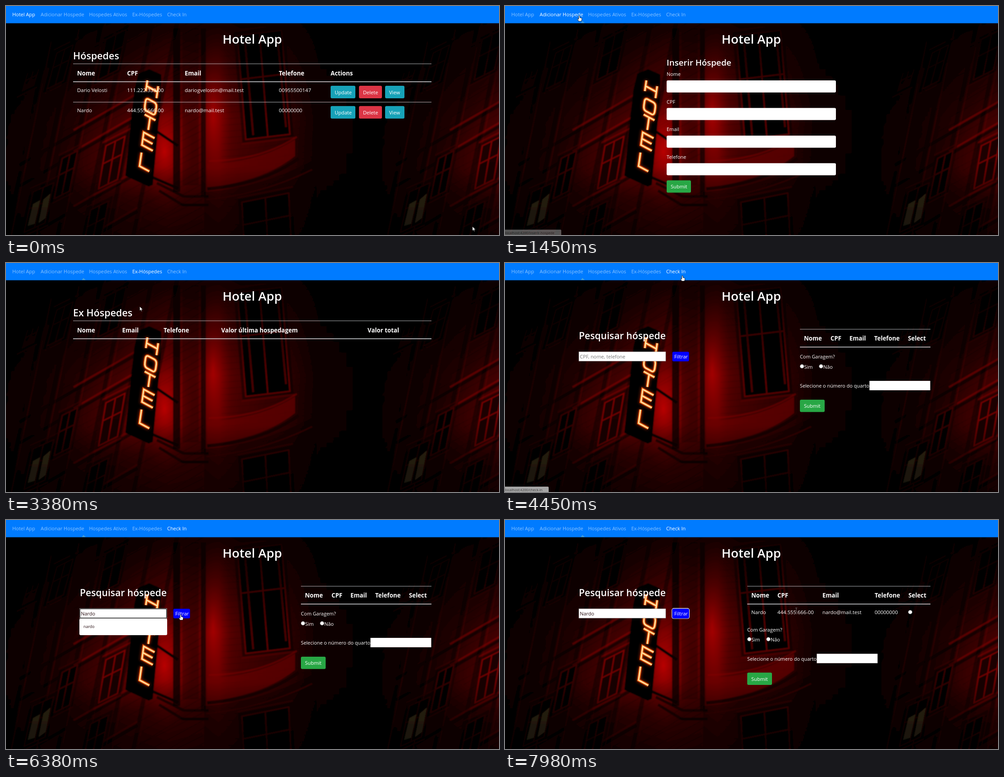
These frames come from a looping animation (1095 by 511 pixels, 8000 ms). An HTML page:

```html
<!DOCTYPE html>
<html lang="pt">
<head>
<meta charset="utf-8">
<title>Hotel App</title>
<style>
  html, body { margin: 0; width: 100%; height: 100%; overflow: hidden; background: #000; }
  svg { display: block; width: 100%; height: 100%; }
  text { font-family: "Open Sans", "Noto Sans", sans-serif; fill: #fff; white-space: pre; }
  .h { font-weight: 600; }
  .b { font-weight: 700; font-size: 13.3px; }
</style>
</head>
<body>
<svg id="stage" viewBox="0 0 1095 511">
  <defs>
    <linearGradient id="wall">
      <stop offset="0" stop-color="#0c0000"/><stop offset=".12" stop-color="#1a0000"/>
      <stop offset=".3" stop-color="#3a0000"/><stop offset=".43" stop-color="#620000"/>
      <stop offset=".52" stop-color="#540000"/><stop offset=".565" stop-color="#680000"/>
      <stop offset=".62" stop-color="#480000"/><stop offset=".75" stop-color="#2c0000"/>
      <stop offset=".83" stop-color="#0c0000"/><stop offset="1" stop-color="#020000"/>
    </linearGradient>
    <linearGradient id="shade" x2="0" y2="1">
      <stop offset="0" stop-opacity=".8"/><stop offset=".25" stop-opacity=".35"/>
      <stop offset=".45" stop-opacity="0"/><stop offset=".68" stop-opacity=".1"/>
      <stop offset=".82" stop-opacity=".5"/><stop offset="1" stop-opacity=".72"/>
    </linearGradient>
    <linearGradient id="corner" x2=".5" y2=".5">
      <stop offset="0" stop-opacity=".95"/><stop offset=".4" stop-opacity=".6"/><stop offset="1" stop-opacity="0"/>
    </linearGradient>
    <radialGradient id="hot">
      <stop offset="0" stop-color="#d00000" stop-opacity=".9"/>
      <stop offset=".5" stop-color="#b00000" stop-opacity=".45"/>
      <stop offset="1" stop-color="#900000" stop-opacity="0"/>
    </radialGradient>
    <filter id="soft"><feGaussianBlur stdDeviation="1.1"/></filter>
    <filter id="glow" x="-50%" width="200%"><feGaussianBlur stdDeviation="3"/></filter>
    <clipPath id="crop"><path d="M0 38H836V511H0Z"/></clipPath>
    <g id="tile" clip-path="url(#crop)"></g>
  </defs>
  <use href="#tile"/><use href="#tile" x="836"/>
  <g id="ui"></g>
  <g id="top"></g>
</svg>
<script>
const $ = id => document.getElementById(id);
const LOOP = 8000;
const GUEST = 'Nardo';
const rect = (x, y, w, h, fill, more = '') =>
  `<rect x="${x}" y="${y}" width="${w}" height="${h}" fill="${fill}" ${more}/>`;
const text = (x, y, s, size = 10.9, more = '') =>
  `<text x="${x}" y="${y}" font-size="${size}" ${more}>${s}</text>`;
const head = (x, y, s, size = 21.6) => text(x, y, s, size, 'class="h"');
const heads = (y, cols) => cols.map(([x, s]) => text(x, y, s, 13.3, 'class="b"')).join('');
const button = (x, y, w, h, fill, s, pad = 9) =>
  rect(x, y, w, h, fill, 'rx="3"') + text(x + pad, y + h / 2 + 4.6, s, 11.1);
const rule = (x, y, h = 1) => rect(x, y, 945 - x, h, '#dee2e6', h > 1 ? '' : 'opacity=".8"');
const radio = (x, y) => `<circle cx="${x}" cy="${y}" r="4.3" fill="#fff" stroke="#767676" stroke-width=".8"/>`;
const line = (d, color, w, more = '') =>
  `<path d="${d}" fill="none" stroke="${color}" stroke-width="${w}" ${more}/>`;

// Night facade: tilted windows, ledges and the neon sign
function windowFrame(x, y, w, h, slope, lean, color, glass = '#060000') {
  return `<g transform="matrix(1 ${slope} ${lean} 1 ${x} ${y})">
    ${rect(-8, -8, w + 16, h + 14, '#000', 'opacity=".4"')}
    ${rect(0, 0, w, h, glass, `stroke="${color}" stroke-width="3"`)}
    ${line(`M${w / 2} 0V${h}M0 ${h * .42}H${w}`, color, 3)}
    ${line(`M-10 -12H${w + 10}M-10 ${h + 9}H${w + 10}`, color, 4, 'opacity=".55"')}</g>`;
}

function facade() {
  let s = rect(0, 38, 836, 473, 'url(#wall)');
  for (let i = 0; i < 40; i++) {
    s += line(`M${120 + i % 3 * 30} ${i * 17 + 130}L440 ${i * 17 - 30}`, '#000', 1.5, 'opacity=".25"');
    s += line(`M478 ${70 + i * 14}Q580 ${66 + i * 14} 690 ${40 + i * 14}`, '#000', 1.2, 'opacity=".18"');
  }
  s += '<ellipse cx="265" cy="370" rx="150" ry="150" fill="url(#hot)" opacity=".28"/>';
  s += '<ellipse cx="352" cy="325" rx="62" ry="135" fill="url(#hot)"/>';
  s += '<ellipse cx="460" cy="235" rx="40" ry="215" fill="url(#hot)" opacity=".7"/>';
  // pilasters and cornices of the left building
  for (let i = 0; i < 6; i++) {
    const x = 25 + i * 56;
    s += line(`M${x + 75} 38L${x - 22} 511`, '#000', 9, 'opacity=".4"');
    s += line(`M${x + 84} 38L${x - 13} 511`, '#700000', 3, 'opacity=".3"');
  }
  for (const y of [215, 262, 385, 470]) {
    s += line(`M30 ${y + 140}L292 ${y - 12}`, '#000', 7, 'opacity=".5"');
    s += line(`M150 ${y + 62}L292 ${y - 20}`, '#8a0000', 4, 'opacity=".55"');
  }
  s += windowFrame(48, 150, 26, 40, -.5, -.3, '#1c0400', '#17100a');
  s += windowFrame(113, 105, 36, 80, -.5, -.27, '#360000');
  s += windowFrame(222, 75, 45, 90, -.5, -.2, '#420000');
  s += windowFrame(222, 312, 42, 96, -.5, -.17, '#820000', '#1c0000');
  s += windowFrame(125, 340, 34, 90, -.5, -.2, '#400000');
  s += windowFrame(60, 415, 46, 90, -.45, -.22, '#2c0000');
  s += windowFrame(188, 455, 40, 90, -.5, -.2, '#480000');
  s += '<path d="M60 442L76 433 64 486 48 491ZM83 432L99 418 88 473 72 485Z" fill="#4a3a18"/>';
  // round tower with its bay window and ledge
  s += windowFrame(514, 66, 98, 232, -.12, .08, '#5c0000', '#060000');
  s += line('M531 80L549 288M603 70L622 270', '#4a0000', 4);
  s += '<path d="M447 352Q560 350 642 298V335Q570 392 447 404Z" fill="#780000" opacity=".6"/>';
  s += line('M450 346Q565 345 646 292', '#900000', 4, 'opacity=".45"');
  s += line('M447 408Q570 398 650 340', '#100000', 7, 'opacity=".7"');
  s += '<path d="M440 415Q570 406 690 340V511H440Z" fill="#000" opacity=".3"/>';
  s += line('M445 432Q570 420 680 365', '#600000', 3, 'opacity=".5"');
  s += windowFrame(524, 438, 104, 120, -.2, .05, '#520000', '#080000');
  s += rect(371, 50, 16, 365, '#080000', 'opacity=".75"') + rect(433, 50, 11, 375, '#080000', 'opacity=".65"');
  s += rect(392, 50, 36, 350, '#000', 'opacity=".2"');
  s += line('M335 395L395 425L450 425M340 412L392 444L450 444', '#100000', 6, 'opacity=".7"');
  s += rect(0, 38, 836, 473, 'url(#shade)') + rect(0, 38, 400, 473, 'url(#corner)');
  s += line('M335 280L382 312M320 380L382 407', '#0a0000', 6);
  s += '<path d="M285 188L294 151 318 141 345 153 345 196 326 399 317 403 265 379Z" fill="#050101"/>';

  const glyphs = [
    [314, 166, 'M0 0V.85M1 0V.95M0 .45H1'],
    [311, 205, 'M.25 0H.75Q1 0 1 .3V.6Q1 .95 .75 .95H.25Q0 .95 0 .6V.3Q0 0 .25 0Z'],
    [308, 242, 'M0 0H1M.5 0V1'],
    [306, 282, 'M1 0H0V1H1M0 .5H.9'],
    [301, 327, 'M0 0V1.08H.9']
  ];
  const neon = (color, w, more = '') => `<g ${more}>` + glyphs.map(([x, y, d]) =>
    line(d, color, w, `transform="matrix(24 13 -4 28 ${x} ${y})" vector-effect="non-scaling-stroke"`)).join('') + '</g>';
  return `<g filter="url(#soft)">${s}</g>` + neon('#e03000', 8, 'filter="url(#glow)" opacity=".6"') +
    neon('#b83a04', 7) + neon('#ff8c2a', 4.6) + neon('#ffe6b0', 2.4);
}
$('tile').innerHTML = facade();

// Pages
function guests() {
  const rows = [
    ['Dario Velosti', '111.222.333-00', 'dariogvelostin@mail.test', '00955500147'],
    [GUEST, '444.555.666-00', 'nardo@mail.test', '00000000']
  ];
  return head(149, 118.5, 'Hóspedes') + rule(149, 128.5) + rule(149, 168.3, 1.5) + rule(149, 214) +
    heads(154.7, [[158, 'Nome'], [269, 'CPF'], [397, 'Email'], [606, 'Telefone'], [721, 'Actions']]) +
    rows.map((row, i) => {
      const y = 178 + i * 45.3;
      return row.map((s, k) => text([158, 269, 397, 606][k], y + 14, s, 11.4)).join('') +
        button(721, y, 55, 28, '#17a2b8', 'Update') + button(784, y, 51, 28, '#dc3545', 'Delete') +
        button(842, y, 43, 28, '#17a2b8', 'View');
    }).join('');
}

const insertForm = () => head(359, 132.6, 'Inserir Hóspede', 18.8) +
  ['Nome', 'CPF', 'Email', 'Telefone'].map((s, i) =>
    text(359, 156 + i * 61.6, s) + rect(359, 166 + i * 61.6, 376, 27, '#fff', 'rx="3"')).join('') +
  button(359, 389, 54, 27.5, '#28a745', 'Submit');

const formerGuests = () => head(149, 118.5, 'Ex Hóspedes') + rule(149, 128.5) + rule(149, 168.3, 1.5) +
  heads(154.7, [[158, 'Nome'], [258, 'Email'], [350, 'Telefone'], [478, 'Valor última hospedagem'], [803, 'Valor total']]);

const roomForm = () => text(655, 213, 'Com Garagem?') + radio(659.6, 230.5) + text(664.5, 235.5, 'Sim') +
  radio(702, 230.5) + text(707, 235.5, 'Não') + text(655, 278, 'Selecione o número do quarto') +
  rect(809.5, 263, 135, 21, '#fff') + button(655, 305, 55, 27.5, '#28a745', 'Submit');

function results(found) {
  const x = found ? [547, 605, 705, 821, 896] : [664, 723, 765, 820, 895];
  const names = ['Nome', 'CPF', 'Email', 'Telefone', 'Select'];
  const row = [GUEST, '444.555.666-00', 'nardo@mail.test', '00000000'];
  return rule(x[0] - 9, 147.3) + rule(x[0] - 9, 186.8, 1.5) + heads(173, names.map((s, i) => [x[i], s])) +
    (found ? row.map((s, i) => text(x[i], 210, s, 11.3)).join('') + radio(900, 205.5) : '') +
    `<g transform="translate(${found ? '-117 35.5' : '0 0'})">${roomForm()}</g>`;
}

function search(t) {
  const focus = t >= 5380 && t < 6720;
  const typed = t < 5580 ? '' : t < 5640 ? 'N' : t < 5710 ? 'Nard' : GUEST;
  let s = head(164, 169.5, 'Pesquisar hóspede', 21.2);
  s += focus
    ? rect(163, 197, 195, 23, '#fff', 'rx="2"') + rect(164.2, 198.2, 192.6, 20.6, '#fff', 'stroke="#101010" stroke-width="1.6" rx="1"')
    : rect(164, 198, 193, 21, '#fff', 'stroke="#8a8a8a" stroke-width=".7"');
  s += text(166.3, 213, typed || 'CPF, nome, telefone', 10.9, `style="fill:${typed ? '#2a1014' : '#757575'}"`);
  if (focus && t < 6240) s += rect(typed ? 166.8 + typed.length * 6.4 : 166.5, 202, .8, 13, '#000');
  if (t >= 6720) s += rect(370.8, 197.2, 38.6, 22.8, '#000', 'rx="4" stroke="#fff" stroke-width="1.2"');
  s += button(371.7, 198, 37, 21.5, '#00f', 'Filtrar', 4.2);
  if (t >= 5580 && t < 6720) {
    const items = t < 5640 ? ['nardo', 'novo', 'nome', 'noite', 'nota'] : ['nardo'];
    s += rect(163, 220, 195, 16.5 + items.length * 20.5, '#fff', 'rx="3"') +
      items.map((w, i) => text(172, 241.3 + i * 20.5, w, 8.9, 'style="fill:#2a1014"')).join('');
  }
  return s;
}

// Timeline
const moves = [[70, 1036, 492], [850, 218, 90], [910, 218, 90], [1080, 165, 21.5], [1840, 165, 21.5],
  [2150, 235, 27], [2330, 351, 27], [2570, 286, 17], [3230, 286, 17], [3380, 297, 97], [3480, 300, 94],
  [3900, 395, 23], [4400, 395, 23], [4910, 356, 196], [4970, 355, 198], [5160, 290, 217],
  [6040, 290, 213], [6380, 388, 211], [7430, 388, 211], [7970, 647, 201]];
const clicks = [[1200, 165, 21], [2680, 286, 16], [4130, 395, 23], [6650, 388, 211]];
const statuses = [[1060, 1200, 1710, 'inserir-hospede'], [2030, 2200, 2270, 'hospedes-ativos'],
  [2450, 3240, 3350, 'ex-hospedes'], [3880, 4900, 5060, 'check-in']];
const links = [[14, 66, 'Hotel App'], [77, 174, 'Adicionar Hospede'], [184.5, 270, 'Hospedes Ativos'],
  [280.5, 347, 'Ex-Hóspedes'], [358, 402, 'Check In']];
const pointers = {
  arrow: '<path d="M0 0V9.6L2.2 7.6 3.8 11 5.2 10.4 3.7 7.1H6.8Z" fill="#fff" stroke="#000" stroke-width=".6"/>',
  hand: '<path d="M-1.2 1Q0-.8 1.2 1V4.6L4.8 5.6Q6 6 5.7 8L4.8 12.5H-1.4L-4 7.8Q-4 6.2-2.6 7L-1.2 8.4Z" fill="#fff" stroke="#000" stroke-width=".8"/>',
  beam: line('M-2-5Q0-5 0-4Q0-5 2-5M0-4V4M-2 5Q0 5 0 4Q0 5 2 5', '#777', 1)
};

function cursorAt(t) {
  const i = moves.findIndex(m => m[0] > t);
  if (i < 1) return (i ? moves[moves.length - 1] : moves[0]).slice(1);
  const [t0, x0, y0] = moves[i - 1], [t1, x1, y1] = moves[i];
  let k = (t - t0) / (t1 - t0);
  k *= k * (3 - 2 * k);
  return [x0 + (x1 - x0) * k, y0 + (y1 - y0) * k];
}

const pageAt = t => t < 1330 ? 0 : t < 2830 ? 1 : t < 4260 ? 3 : 4;
const inside = (x, y, l, t, r, b) => x >= l && x <= r && y >= t && y <= b;

function pageMarkup(page, t) {
  if (page === 0) return guests();
  if (page === 1) return insertForm();
  if (page === 3) return formerGuests();
  return results(t >= 7440) + search(t);
}

function overlay(t, page) {
  const [x, y] = cursorAt(t);
  const hover = links.findIndex(([l, r]) => inside(x, y, l, 8, r, 31));
  let s = rect(0, 0, 1095, 38.5, '#007bff');
  if (t >= 1330) s += '<path d="M168.5 38L172 33.5 177 38Z" fill="#45a0d8"/>';
  links.forEach(([l, , label], i) => {
    s += text(l, 23, label, 10.95, `opacity="${i === page ? 1 : i === hover ? .9 : .55}"`);
  });
  for (const [from, fade, to, path] of statuses) {
    if (t < from || t >= to) continue;
    const alpha = t < fade ? 1 : (to - t) / (to - fade);
    const url = 'localhost:4200/' + path;
    s += `<g opacity="${alpha}">` + rect(-4, 499, url.length * 4 + 9, 16, '#a5a5a5', 'rx="2"') +
      text(0, 509.3, url, 7.6, 'style="fill:#333"') + '</g>';
  }
  for (const [at, cx, cy] of clicks)
    if (t >= at && t < at + 150) s += `<circle cx="${cx}" cy="${cy}" r="9" fill="#d2cf40" opacity=".72"/>`;
  if (t >= 5580 && t < 6050) return s;
  const onButton = page === 4 && inside(x, y, 371, 198, 409, 220);
  const onText = page === 4 && (inside(x, y, 164, 198, 357, 219) || inside(x, y, 605, 195, 688, 214));
  const kind = hover >= 0 || onButton ? 'hand' : onText ? 'beam' : 'arrow';
  return s + `<g transform="translate(${x} ${y})">${pointers[kind]}</g>`;
}

let shown = '';
function draw(t) {
  const page = pageAt(t);
  const markup = head(547, 84, 'Hotel App', 27.6).replace('<text', '<text text-anchor="middle"') + pageMarkup(page, t);
  if (markup !== shown) $('ui').innerHTML = shown = markup;
  $('top').innerHTML = overlay(t, page);
}

const start = performance.now();
function tick() {
  draw((performance.now() - start) % LOOP);
  requestAnimationFrame(tick);
}
tick();
</script>
</body>
</html>
```
